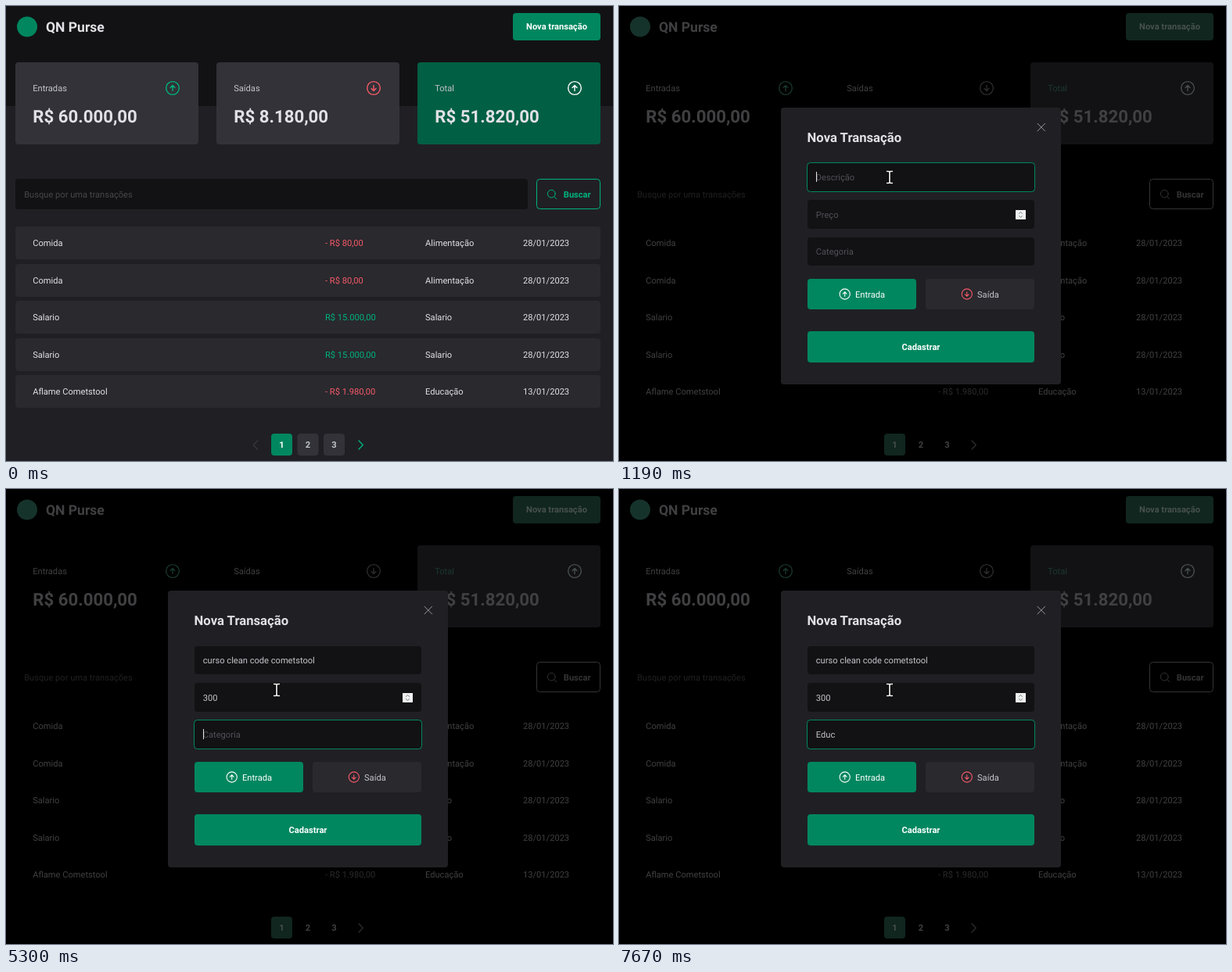
Animation of 776 by 582 pixels, one loop 8000 ms. Source, as an HTML page:

```html
<!DOCTYPE html>
<html lang="pt-BR">
<head>
<meta charset="utf-8">
<title>Transações</title>
<style>
  html, body { margin: 0; width: 100%; height: 100%; overflow: hidden; background: #000; }
  svg { display: block; width: 776px; height: 582px; }
  #page {
    --bg: #202024; --head: #121214; --card: #323238; --row: #29292e; --total: #015f43;
    --btn: #00875f; --fg: #e1e1e6; --label: #c4c4cc; --totalLabel: #c4c4cc; --white: #fff;
    --hint: #47474d; --red: #f75a68; --green: #00b37e; --find: #00b37e; --down: #f75a68;
    --off: #36363c; --next: #00b37e; --logo: #00875f;
  }
  #page.dim {
    --bg: #000; --head: #000; --card: #000; --row: #000; --total: #121214;
    --btn: #10261f; --fg: #404042; --label: #404042; --totalLabel: #1c382e; --white: #48504d;
    --hint: #202022; --red: #2a2a2c; --green: #17362d; --find: #343436; --down: #2c2c2e;
    --off: #000; --next: #2c2c2e; --logo: #16332b;
  }
  text { font: 400 11.12px Roboto, sans-serif; text-rendering: geometricPrecision; white-space: pre; }
  .b { font-weight: 700; }
  .mid { text-anchor: middle; }
  .line { fill: none; stroke-linecap: round; stroke-linejoin: round; }
</style>
</head>
<body>
<svg viewBox="0 0 776 582">
  <defs>
    <g id="up" class="line" stroke-width="16">
      <circle r="96"/><path d="M-34-6 0-40 34-6M0 40V-40"/>
    </g>
    <g id="arrow">
      <path d="M0 0V16.2L3.8 12.8 6.4 18.6 9 17.4 6.5 11.8H11.4Z" fill="#151517" stroke="#fff" stroke-width="1.1"/>
    </g>
    <g id="beam" fill="none">
      <path d="M-4-7.5H-1L0-6.5 1-7.5H4M-4 7.5H-1L0 6.5 1 7.5H4M0-6.5V6.5" stroke="#000" stroke-width="3.4"/>
      <path d="M-4-7.5H-1L0-6.5 1-7.5H4M-4 7.5H-1L0 6.5 1 7.5H4M0-6.5V6.5" stroke="#fff" stroke-width="1.6"/>
    </g>
  </defs>
  <g id="page"></g>
  <g id="modal"></g>
  <g id="pointer"><use id="asArrow" href="#arrow"/><use id="asBeam" href="#beam"/></g>
</svg>
<script>
const LOOP = 8000;
const $ = id => document.getElementById(id);
const show = (el, on) => el.setAttribute('visibility', on ? 'visible' : 'hidden');

const box = (x, y, w, h, fill, more = '') =>
  `<rect x="${x}" y="${y}" width="${w}" height="${h}" rx="4" style="fill:${fill}" ${more}/>`;
const text = (x, y, s, fill, cls = '', size = 11.12) =>
  `<text x="${x}" y="${y}" class="${cls}" style="fill:${fill};font-size:${size}px">${s}</text>`;
const ring = (id, x, y, w, h, r = 4) =>
  `<rect id="${id}" x="${x}" y="${y}" width="${w}" height="${h}" rx="${r}" fill="none" stroke="#00875f"/>`;
const icon = (x, y, size, color, turn = 0) =>
  `<use href="#up" transform="translate(${x} ${y}) rotate(${turn}) scale(${size / 256})" style="stroke:${color}"/>`;
const path = (d, color, width) =>
  `<path class="line" d="${d}" style="stroke:${color}" stroke-width="${width}"/>`;

const card = (x, fill, label, labelFill, amount, color, turn) =>
  box(x, 72, 234, 105, fill) + text(x + 22.2, 109, label, labelFill) +
  icon(x + 201, 105, 22.24, color, turn) + text(x + 22.2, 149, amount, 'var(--fg)', 'b', 22.24);

const row = ([name, price, kind, date], i) => {
  const y = 282 + i * 47.55, base = Math.round(y + 25);
  return box(12, Math.round(y), 748, 42, 'var(--row)') + text(34.2, base, name, 'var(--fg)') +
    text(408, base, price, price[0] === '-' ? 'var(--red)' : 'var(--green)') +
    text(536, base, kind, 'var(--fg)') + text(661, base, date, 'var(--fg)');
};

const food = ['Comida', '- R$ 80,00', 'Alimentação', '28/01/2023'];
const pay = ['Salario', 'R$ 15.000,00', 'Salario', '28/01/2023'];
const course = ['Aflame Cometstool', '- R$ 1.980,00', 'Educação', '13/01/2023'];

$('page').innerHTML =
  box(-5, -5, 786, 592, 'var(--bg)') + box(-5, -5, 786, 133, 'var(--head)', 'shape-rendering="crispEdges"') +
  '<circle cx="27" cy="26.5" r="13" style="fill:var(--logo)"/>' +
  text(51, 33, 'QN Purse', 'var(--fg)', 'b', 17.5) +
  box(648, 9, 112, 35, 'var(--btn)') + box(648, 9, 112, 35, '#015f43', 'id="hover"') +
  ring('btnRing', 647.5, 8.5, 113, 36) +
  text(704, 30, 'Nova transação', 'var(--white)', 'b mid') +
  card(12, 'var(--card)', 'Entradas', 'var(--label)', 'R$ 60.000,00', 'var(--green)', 0) +
  card(269, 'var(--card)', 'Saídas', 'var(--label)', 'R$ 8.180,00', 'var(--down)', 180) +
  card(526, 'var(--total)', 'Total', 'var(--totalLabel)', 'R$ 51.820,00', 'var(--white)', 0) +
  box(12, 221, 655, 39, 'var(--head)') + text(23.2, 245, 'Busque por uma transações', 'var(--hint)') +
  box(678.5, 221.5, 81, 38, 'none', 'stroke="currentColor" color="var(--find)"')
    .replace('fill:none', 'fill:none;stroke:var(--find)') +
  path('M702.2 240.2a4.9 4.9 0 1 1-9.8 0a4.9 4.9 0 1 1 9.8 0M700.8 243.8l2.8 2.8', 'var(--find)', 1) +
  text(712.8, 245, 'Buscar', 'var(--find)', 'b') +
  [food, food, pay, pay, course].map(row).join('') +
  path('M321.5 556l-5.3 5.5 5.3 5.5', 'var(--off)', 1.3) +
  [1, 2, 3].map(n => {
    const x = 305.5 + n * 33.5;
    return box(x, 547, 27, 28, n === 1 ? 'var(--btn)' : 'var(--card)') +
      text(x + 13.5, 565, n, n === 1 ? 'var(--white)' : 'var(--label)', 'b mid');
  }).join('') +
  path('M451 556l5.3 5.5-5.3 5.5', 'var(--next)', 1.3);

const fields = [
  { y: 201, h: 36, hint: 'Descrição' },
  { y: 248, h: 37, hint: 'Preço' },
  { y: 296, h: 36, hint: 'Categoria' }
];

$('modal').innerHTML =
  box(207, 130, 358, 354, '#202024') + text(240.6, 174, 'Nova Transação', '#e1e1e6', 'b', 16.68) +
  path('M535 150.3l9.6 9.6M544.6 150.3l-9.6 9.6', '#96969c', 1) + ring('closeRing', 530.5, 145.5, 18, 18, 0) +
  fields.map((f, i) => box(241, f.y, 290, f.h, '#121214') +
    ring('ring' + i, 240.5, f.y - .5, 291, f.h + 1) +
    `<text id="value${i}" x="251.8" y="${f.y + (i === 1 ? 23 : 22)}"></text>`).join('') +
  '<rect x="507" y="261" width="13" height="12" fill="#efefef"/>' +
  path('M511.5 265.5l2-2 2 2M511.5 268.5l2 2 2-2', '#6f8580', 1) +
  '<rect id="caret" width="1" height="13" fill="#e1e1e6"/>' +
  box(241, 349, 139, 39, '#00875f') + icon(288.7, 368.5, 17.6, '#fff') + text(302, 373, 'Entrada', '#fff') +
  box(392, 349, 139, 39, '#29292e') + icon(444.8, 368.5, 17.6, '#f75a68', 180) + text(458, 373, 'Saída', '#c4c4cc') +
  box(241, 416, 290, 40, '#00875f') + text(386, 440, 'Cadastrar', '#fff', 'b mid');

// Each track is a list of [time, value]; the latest passed entry holds.
const typed = [
  [[0, ''], [2020, 'curso clean code cometstool']],
  [[0, ''], [3330, '3'], [3610, '30'], [3920, '300'], [4100, '3000'], [4830, '300']],
  [[0, ''], [6230, 'E'], [6640, 'Ed'], [7310, 'Edu'], [7670, 'Educ']]
];
const focus = [[0, -1], [1140, 0], [2420, 1], [5300, 2]];
const moves = [[80, 717, 7], [310, 709.5, 25.5], [660, 709.5, 25.5], [1140, 346, 219], [2020, 346, 219], [2420, 346, 257]];

const at = (track, t) => track.filter(([start]) => t >= start).pop()[1];
const ease = p => p * p * (3 - 2 * p);
const clamp = v => Math.min(1, Math.max(0, v));

function pointerAt(t) {
  let [, x, y] = moves[0];
  for (let i = 1; i < moves.length; i++) {
    const [t0, x0, y0] = moves[i - 1], [t1, x1, y1] = moves[i];
    if (t < t0) break;
    const p = ease(clamp((t - t0) / (t1 - t0)));
    x = x0 + (x1 - x0) * p;
    y = y0 + (y1 - y0) * p;
  }
  return [Math.round(x * 2) / 2, Math.round(y * 2) / 2];
}

function render(t) {
  const open = t >= 550, active = at(focus, t);
  $('page').setAttribute('class', open ? 'dim' : '');
  $('hover').setAttribute('opacity', open ? 0 : clamp((t - 60) / 230));
  show($('btnRing'), t >= 460 && !open);
  $('btnRing').setAttribute('opacity', t < 510 ? .6 : 1);
  $('modal').setAttribute('display', open ? 'inline' : 'none');
  show($('closeRing'), open && active < 0);

  fields.forEach((f, i) => {
    const value = at(typed[i], t), el = $('value' + i);
    const shown = value || f.hint;
    if (el.textContent !== shown) el.textContent = shown;
    el.style.fill = value ? '#c4c4cc' : '#505059';
    show($('ring' + i), active === i);
    if (active === i) {
      const end = value ? el.getComputedTextLength() : 0;
      $('caret').setAttribute('x', Math.round(251.8 + end));
      $('caret').setAttribute('y', f.y + (i === 1 ? 12 : 11));
    }
  });
  show($('caret'), open && active >= 0 && t < 7670);

  const [x, y] = pointerAt(t);
  const inField = open && x < 531 && y >= 201;
  $('pointer').setAttribute('transform', `translate(${x} ${y})`);
  show($('asArrow'), t >= 80 && !inField);
  show($('asBeam'), inField);
}

const started = performance.now();
function tick() {
  render((performance.now() - started) % LOOP);
  requestAnimationFrame(tick);
}
tick();
</script>
</body>
</html>
```
